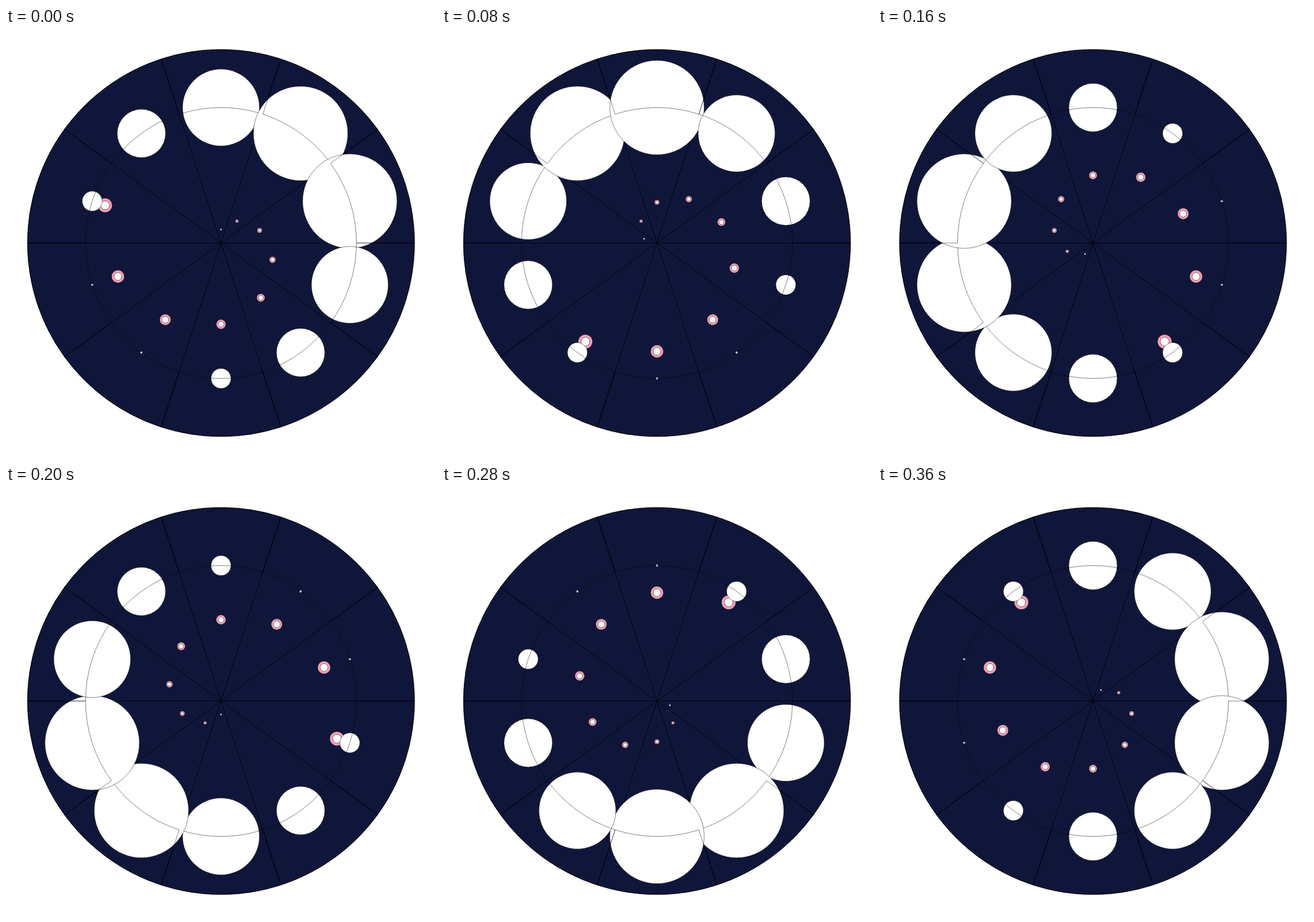
Recreate the animation shown at these times as an HTML page with a canvas. Size 748x748 px, loop 0.4 s.

```html
<!DOCTYPE html>
<html lang="en">
<head>
<meta charset="utf-8">
<title>Phenakistoscope</title>
<style>
  html, body { margin: 0; width: 100%; height: 100%; overflow: hidden; background: #fff; }
  canvas { display: block; }
</style>
</head>
<body>
<canvas id="stage" width="748" height="748"></canvas>
<script>
const ctx = document.getElementById('stage').getContext('2d');
const C = 374, R = C * 0.9, RING = R * 0.7;
const N = 10, STEP_MS = 40, SLICE = 2 * Math.PI / N;
const NAVY = '#10163a', PINK = '#f79fb1', WHITE = '#fff';

function disc(x, y, r, fill, outlined = true) {
  ctx.beginPath();
  ctx.arc(x, y, r, 0, 2 * Math.PI);
  ctx.fillStyle = fill;
  ctx.fill();
  if (outlined) ctx.stroke();
}

// Path of one slice, from radius `inner` to the rim.
function slice(mid, inner) {
  const a = mid - SLICE / 2, b = mid + SLICE / 2;
  ctx.beginPath();
  ctx.arc(C, C, R, a, b);
  if (inner) ctx.arc(C, C, inner, b, a, true);
  else ctx.lineTo(C, C);
  ctx.closePath();
  ctx.stroke();
}

function draw(step) {
  ctx.fillStyle = WHITE;
  ctx.fillRect(0, 0, 2 * C, 2 * C);
  ctx.strokeStyle = '#000';
  ctx.lineWidth = 0.5;

  disc(C, C, R, NAVY);
  for (let i = 0; i < N; i++) slice(i * SLICE - Math.PI / 2, 0);

  for (let i = 0; i < N; i++) {
    const angle = (i - step) * SLICE - Math.PI / 2;
    const dx = Math.cos(angle), dy = Math.sin(angle);
    const grow = (i + 1) / N;

    // small ring travelling outwards
    const x = C + dx * RING * grow, y = C + dy * RING * grow;
    if (i) {
      disc(x, y, R * 0.04 * grow, PINK, false);
      disc(x, y, R * 0.025 * grow, WHITE);
    } else {
      disc(x, y, 1.2, WHITE, false);
    }

    // large pulsing ball, with the outer slice outlined on top
    const ball = R / 8 * (1 + Math.cos((i - 1.5) * SLICE));
    disc(C + dx * RING, C + dy * RING, ball, WHITE);
    slice(angle, RING);
  }
}

let shown = -1;
const start = performance.now();

function tick() {
  const step = Math.floor((performance.now() - start) / STEP_MS) % N;
  if (step !== shown) draw(shown = step);
  requestAnimationFrame(tick);
}
tick();
</script>
</body>
</html>
```
